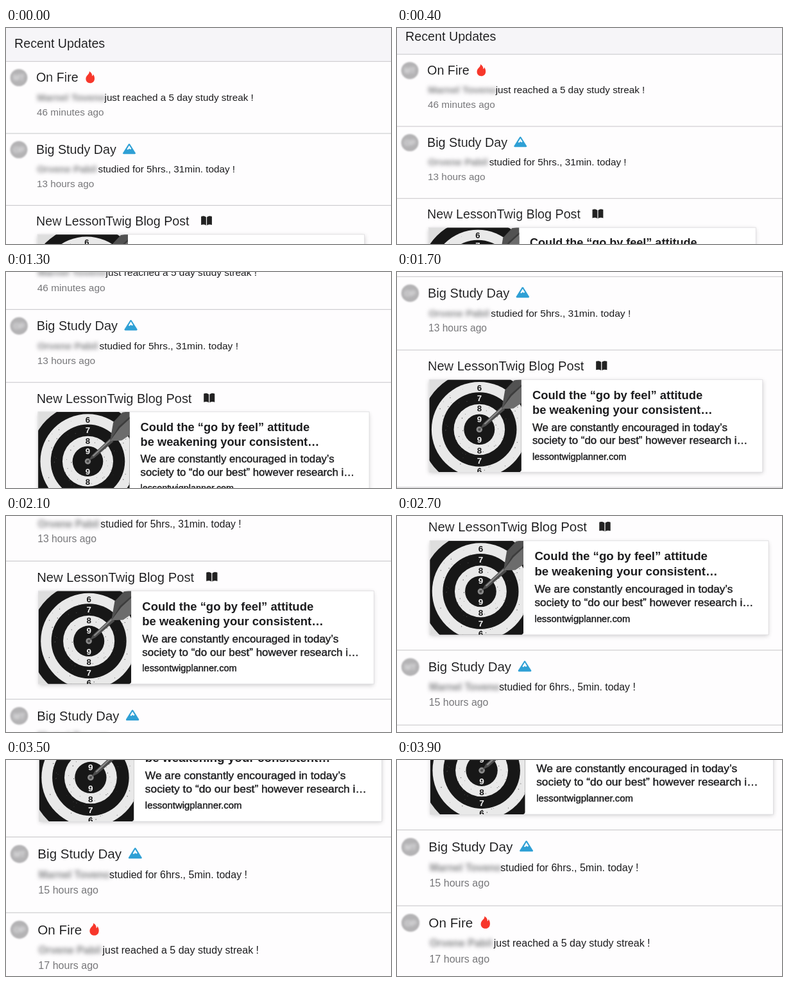
Write an HTML page with a canvas that moves like this. It is 600 px wide and 338 px high and loops after 4000 ms.

```html
<!DOCTYPE html>
<html lang="en">
<head>
<meta charset="utf-8">
<title>Recent updates feed</title>
<style>
  html, body { margin: 0; width: 100%; height: 100%; overflow: hidden; background: #fefdfe; }
  canvas { display: block; width: 600px; height: 338px; }
</style>
</head>
<body>
<canvas id="stage"></canvas>
<script>
const W = 600, H = 338, LOOP = 4000, STEP = 100;
const PAGE = '#fefdfe', HEADER = '#f6f5f8', INK = '#1c1c1e', GREY = '#77777a';
const FAMILY = '"Liberation Sans", Arial, sans-serif';
const PEOPLE = [
  { name: 'Marnel Toveno', initials: 'MT', textX: 153.5 },
  { name: 'Orvene Pabil', initials: 'OP', textX: 143.5 }
];

const canvas = document.getElementById('stage');
const ctx = canvas.getContext('2d');
const dpr = window.devicePixelRatio || 1;
canvas.width = W * dpr;
canvas.height = H * dpr;

// Scroll distance: a quick start, a cruise that gains a little speed, steady braking.
function scrollAt(t) {
  const speed = 0.128, gain = 5.5e-6, rise = 910, brake = 3070, stop = 3865;
  const starting = Math.min(t, rise);
  const cruising = Math.max(0, Math.min(t, brake) - rise);
  const braking = Math.max(0, Math.min(t, stop) - brake);
  const topSpeed = speed + gain * (brake - rise);
  return speed * starting * starting / (2 * rise)
    + speed * cruising + gain * cruising * cruising / 2
    + topSpeed * (braking - braking * braking / (2 * (stop - brake)));
}

function rect(x, y, w, h, color) {
  ctx.fillStyle = color;
  ctx.fillRect(x, y, w, h);
}

function disc(x, y, r, color) {
  ctx.fillStyle = color;
  ctx.beginPath();
  ctx.arc(x, y, r, 0, Math.PI * 2);
  ctx.fill();
}

function polygon(color, ...points) {
  ctx.fillStyle = color;
  ctx.beginPath();
  for (const [x, y] of points) ctx.lineTo(x, y);
  ctx.closePath();
  ctx.fill();
}

function fillPath(color, path) {
  ctx.fillStyle = color;
  ctx.fill(new Path2D(path));
}

// An outline in the background colour lightens the letters; in the ink colour it strengthens them.
function text(str, x, y, size, { color = INK, weight = 400, edge, edgeWidth = 0.4, align = 'left' } = {}) {
  ctx.font = `${weight} ${size}px ${FAMILY}`;
  ctx.textAlign = align;
  ctx.fillStyle = color;
  ctx.fillText(str, x, y);
  if (!edge) return;
  ctx.lineJoin = 'round';
  ctx.lineWidth = edgeWidth;
  ctx.strokeStyle = edge;
  ctx.strokeText(str, x, y);
}

function blurred(radius, draw) {
  ctx.save();
  ctx.filter = `blur(${radius * dpr}px)`;
  draw();
  ctx.restore();
}

function at(x, y, draw) {
  ctx.save();
  ctx.translate(x, y);
  draw();
  ctx.restore();
}

function heading(str, y, bg = PAGE, x = 47) {
  text(str, x, y, 19.7, { color: '#0c0c0e', edge: bg, edgeWidth: 0.22 });
}

function divider(y) {
  rect(0, y - 0.5, W, 1, '#c6c5c8');
}

function flame() {
  ctx.scale(0.92, 1);
  fillPath('#f7372b', 'M-1.5-9.5C3-7 3.5-4 3.2-2C4.5-2.5 5-3.5 5-5C7-2.5 7.6 0 7.4 2.5' +
    'C7 6.8 4 9 0 9C-4.3 9-7.4 6.3-7.4 2.3C-7.4-.7-5.6-2.6-3.6-4.6C-2-6.2-1.3-7.5-1.5-9.5Z');
}

function mountain() {
  fillPath('#2fa0d5', 'M-1.2-7.5Q0-9 1.2-7.5L9.8 6.2Q10.4 8 8.8 8H-8.8Q-10.4 8-9.8 6.2Z');
  fillPath('#fff', 'M0-5.6L3.4-.2L1.5.8L0-.7L-1.8 1.2L-3.6.4Z');
}

function book() {
  const page = 'M-.6-5.6C-2.8-7.6-6-7.6-8.4-6.6V6.6C-6 5.6-2.8 5.7-.6 7.4Z';
  fillPath('#222', page);
  ctx.scale(-1, 1);
  fillPath('#222', page);
}

function update(top, kind, person, message, age) {
  divider(top);
  blurred(0.8, () => disc(20, top + 25.4, 13.4, '#b4b3b5'));
  blurred(2, () => text(person.initials, 20, top + 30, 12,
    { color: '#e2e2e4', weight: 700, align: 'center' }));
  if (kind === 'fire') {
    heading('On Fire', top + 32);
    at(131.2, top + 25, flame);
  } else {
    heading('Big Study Day', top + 32);
    at(192, top + 24.3, mountain);
  }
  blurred(3, () => text(person.name, 48.5, top + 61.2, 15.2, { color: '#808083', weight: 700 }));
  text(message, person.textX, top + 61.2, 15.25);
  text(age, 48, top + 84.2, 15.3, { color: GREY });
}

function dartboard(x, y, w, h) {
  const cx = 125.8, cy = 399.5, pale = '#e9e9e9', dark = '#171717';
  ctx.save();
  ctx.beginPath();
  ctx.rect(x, y, w, h);
  ctx.clip();
  rect(x, y, w, h, '#dedede');
  [[90, dark], [73, pale], [57, dark], [39, pale], [23.5, dark]]
    .forEach(([r, color]) => disc(cx, cy, r, color));

  let seed = 7;
  const random = () => (seed = seed * 16807 % 2147483647) / 2147483647;
  for (let i = 0; i < 90; i++) {
    const angle = random() * Math.PI * 2, r = 25 + random() * 47;
    const onPale = r > 57 || r < 39;
    disc(cx + r * Math.cos(angle), cy + r * Math.sin(angle), 0.3 + random() * 0.4,
      onPale ? '#555' : '#444');
  }

  [9, 8, 7, 6].forEach((digit, i) => {
    const offset = 16 * (i + 1);
    for (const side of [-1, 1]) {
      text(String(digit), cx, cy + side * offset + 4.6, 13,
        { color: i % 2 ? dark : '#f2f2f2', weight: 700, align: 'center' });
    }
  });

  disc(cx, cy, 4.6, '#8b8b8b');
  disc(cx, cy, 2, '#4a4a4a');
  polygon('#4c4c4c', [cx + 1, cy - 1], [132, 390], [160, 364], [165, 369], [136, 394]);
  polygon('#8a8a8a', [133, 390.5], [160, 365.5], [161.5, 367], [134.5, 392]);
  polygon('#525252', [160, 368], [165, 339], [179, 324], [191, 322], [191, 358], [178, 367]);
  polygon('#6c6c6c', [160, 368], [174, 346], [191, 331], [191, 358], [178, 367]);
  polygon('#3c3c3c', [160, 368], [173, 346], [191, 330], [191, 333], [175, 348]);
  ctx.restore();
}

function blogPost(top) {
  const x = 49.2, y = 323, w = 509.4, h = 142;
  const medium = { edge: INK, edgeWidth: 0.4 };
  divider(top);
  heading('New LessonTwig Blog Post', top + 31.7);
  at(312.5, top + 24, book);

  ctx.save();
  ctx.shadowColor = 'rgba(0,0,0,0.2)';
  ctx.shadowBlur = 7 * dpr;
  ctx.shadowOffsetY = 2 * dpr;
  rect(x, y, w, h, '#fff');
  ctx.restore();
  ctx.lineWidth = 0.8;
  ctx.strokeStyle = '#dcdbde';
  ctx.strokeRect(x, y, w, h);
  dartboard(x + 0.3, y + 0.3, 140.5, h - 0.4);

  text('Could the “go by feel” attitude', 206.8, 352.7, 18, { weight: 700 });
  text('be weakening your consistent…', 206.8, 375.8, 18, { weight: 700 });
  text('We are constantly encouraged in today’s', 206.8, 401.6, 16.55, medium);
  text('society to “do our best” however research i…', 206.8, 422, 16.55, medium);
  text('lessontwigplanner.com', 206.8, 446, 14.2, medium);
}

function feed() {
  const [first, second] = PEOPLE;
  rect(0, 0, W, 52, HEADER);
  heading('Recent Updates', 31.2, HEADER, 13);
  update(52.3, 'fire', first, 'just reached a 5 day study streak !', '46 minutes ago');
  update(165, 'mountain', second, 'studied for 5hrs., 31min. today !', '13 hours ago');
  blogPost(277.6);
  update(488.2, 'mountain', first, 'studied for 6hrs., 5min. today !', '15 hours ago');
  update(601.2, 'fire', second, 'just reached a 5 day study streak !', '17 hours ago');
}

function render(now) {
  const t = Math.floor((now % LOOP) / STEP) * STEP;
  const scroll = scrollAt(t);
  const zoom = 1 + 0.05 * scroll / scrollAt(LOOP);
  ctx.setTransform(dpr, 0, 0, dpr, 0, 0);
  rect(0, 0, W, H, PAGE);
  ctx.translate(0, -scroll);
  ctx.scale(zoom, zoom);
  feed();
}

let start;
function tick(now) {
  start ??= now;
  render(now - start);
  requestAnimationFrame(tick);
}
requestAnimationFrame(tick);
</script>
</body>
</html>
```
